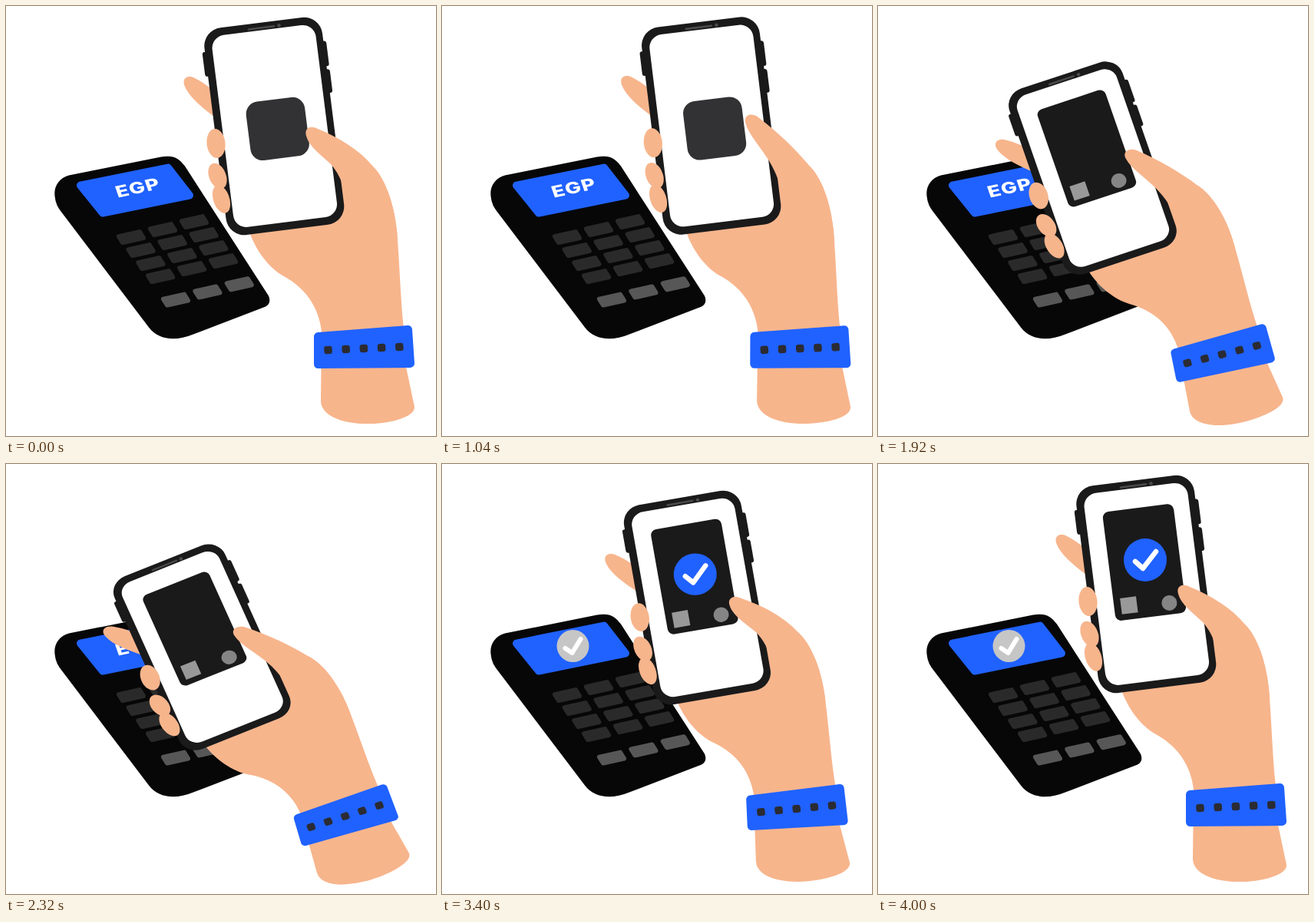
Recreate the animation shown at these times as an HTML page. Size 560x560 px, loop 4160 ms.

```html
<!DOCTYPE html>
<html lang="en">
<head>
<meta charset="utf-8">
<title>Contactless payment</title>
<style>
  html, body { margin: 0; width: 100%; height: 100%; overflow: hidden; background: #fff; }
  svg { display: block; width: 100vw; height: 100vh; }
  .skin { fill: #f7b58c; }
  .blue { fill: #2062ff; }
  .ink { fill: #1a1a1b; }
  .round { stroke-linejoin: round; stroke-linecap: round; }
  .tick { fill: none; stroke: #fff; }
  text { font: 800 21px Inter, "Open Sans", sans-serif; fill: #fff; text-anchor: middle; letter-spacing: .8px; }
</style>
</head>
<body>
<svg viewBox="0 0 560 560">
  <g id="terminal" transform="translate(0 .6)">
    <path fill="#070707" d="M64 250C61 236 68 224 82 220L202 196C217 193 225 197 233 208L342 377Q346 386 338 391L244 427C220 437 198 434 186 418L70 265Q65 258 64 250Z"/>
    <path class="blue round" stroke="#2062ff" stroke-width="10" d="M97 233L211 210L239 246L126 269Z"/>
    <g id="keys"></g>
    <text id="amount" transform="matrix(1.28 -.27 .33 .95 174 243)">EGP</text>
    <g id="paid">
      <circle r="21" fill="#c6c6c6"/>
      <path class="tick round" stroke-width="6" d="M-10 3L-1 9L10 -9"/>
    </g>
  </g>

  <g id="hand">
    <path class="skin" d="M274 146C256 133 239 119 233 105C228 94 237 89 246 94C256 99 262 104 272 111Z"/>
    <path class="skin" d="M318 297L400 200L440 200L478 209C497 228 508 268 510 305C513 345 514 385 518 420L521 470L532 522C533 538 490 545 465 544C432 543 410 531 410 514L411 424C408 397 394 369 361 351.5C341 340 326 318 318 297Z"/>
    <path class="blue round" stroke="#2062ff" stroke-width="11" d="M406.5 430.5L523.5 421.5L526.5 465.5L406.5 466.5Z"/>
    <g id="holes" fill="#2b2b33"></g>

    <g transform="translate(349.3 156.5) rotate(-7.2)">
      <g class="ink">
        <rect x="-81" y="-107" width="10" height="32" rx="3"/>
        <rect x="71" y="-102" width="10" height="33" rx="3"/>
        <rect x="71" y="-65" width="10" height="31" rx="3"/>
        <rect x="-77.4" y="-136" width="154.8" height="272" rx="24"/>
      </g>
      <rect x="-67.5" y="-126" width="136" height="252" rx="17" fill="#fff"/>
      <rect id="icon" x="-34.5" y="-34.5" width="77" height="77" rx="16" fill="#323234"/>
      <g id="card">
        <rect class="ink" x="-46.5" y="-71.5" width="93" height="143" rx="8"/>
        <rect x="-37.5" y="42.5" width="21" height="21" fill="#999"/>
        <circle cx="25.5" cy="56.5" r="10" fill="#858585"/>
      </g>
    </g>
    <path class="round" stroke="#4a4a4c" stroke-width="2.6" d="M316 30.5L349 26.2"/>
    <circle cx="355.5" cy="25.3" r="2.3" fill="#4a4a4c"/>
    <g id="done">
      <circle class="blue" r="28"/>
      <path class="tick round" stroke-width="6.5" d="M-13 2L-3 11L14 -11"/>
    </g>

    <ellipse class="skin" rx="12" ry="19" transform="translate(273.5 179) rotate(-6)"/>
    <ellipse class="skin" rx="11" ry="17.5" transform="translate(275.5 221.5) rotate(-22)"/>
    <ellipse class="skin" rx="10.5" ry="19" transform="translate(280.5 251.5) rotate(-18)"/>
    <path id="thumb" class="skin"/>
  </g>
</svg>
<script>
const LOOP = 4160;
const PIVOT = [466, 541];
const $ = id => document.getElementById(id);

// Smooth 0..1 ramp between two times
const ramp = (t, from, to) => {
  const u = Math.min(1, Math.max(0, (t - from) / (to - from)));
  return u * u * (3 - 2 * u);
};

const key = (x, y, color) =>
  `<path class="round" transform="translate(${x} ${y})" fill="${color}" stroke="${color}" stroke-width="6" d="M-16 -1L11 -7L16 1L-11 7Z"/>`;

let keys = '';
for (let col = 0; col < 3; col++) {
  for (let row = 0; row < 4; row++) {
    keys += key(163 + col * 41 + row * 12.7, 300.5 - col * 10 + row * 17, '#2a2a2a');
  }
  keys += key(221 + col * 41.4, 382 - col * 10.2, '#575757');
}
$('keys').innerHTML = keys;

$('holes').innerHTML = [0, 1, 2, 3, 4].map(i =>
  `<rect x="-5.2" y="-5.2" width="10.4" height="10.4" rx="3" transform="translate(${419.5 + i * 23.2} ${448 - i}) rotate(-4)"/>`).join('');

const place = (id, x, y, scale) =>
  $(id).setAttribute('transform', `translate(${x} ${y}) scale(${scale})`);
const fade = (id, opacity) => $(id).setAttribute('opacity', opacity);

// The hand turns about the wrist and is foreshortened vertically
function poseHand(turn, tilt) {
  const a = turn * 14.7 * Math.PI / 180;
  const b = turn * 16.9 * Math.PI / 180;
  const squash = 1 - .094 * tilt;
  const m = [Math.cos(a), -squash * Math.sin(b), Math.sin(a), squash * Math.cos(b)];
  const [px, py] = PIVOT;
  const e = px - m[0] * px - m[2] * py;
  const f = py - m[1] * px - m[3] * py;
  $('hand').setAttribute('transform', `matrix(${[...m, e, f].join(' ')})`);
}

function poseThumb(lift) {
  const p = (x, y, share) => `${x + 3 * lift * share} ${y - 16 * lift * share}`;
  $('thumb').setAttribute('d',
    `M${p(391, 169, 1)}C${p(388, 159, 1)} ${p(397, 155, 1)} ${p(406, 160, 1)}` +
    `C${p(433, 171, .5)} 460 187 478 209C497 228 508 268 510 305L446 272` +
    `C444 245 438 224 ${p(424, 207, .3)}C${p(411, 194, .7)} ${p(395, 184, 1)} ${p(391, 169, 1)}Z`);
}

function draw(t) {
  const turn = -.014 * ramp(t, 0, 900) + 1.014 * ramp(t, 1430, 2170) + .04 * ramp(t, 2200, 2900)
    - 1.054 * ramp(t, 2980, 3555) + .014 * ramp(t, 3600, 4000);
  const tilt = ramp(t, 1500, 2220) - ramp(t, 3000, 3640);
  poseHand(turn, tilt);
  poseThumb(ramp(t, 40, 480) - ramp(t, 2500, 3150));

  const open = ramp(t, 1200, 1480);
  fade('icon', 1 - open);
  fade('card', open);
  place('card', 1.3, -28.5, .6 + .4 * open);

  place('done', 348, 125, ramp(t, 2480, 2760));
  const paid = ramp(t, 2760, 3200);
  place('paid', 170.5, 236.4, .7 + .3 * paid);
  fade('paid', paid);
  fade('amount', 1 - ramp(t, 2560, 2800));
}

function tick(now) {
  // The last pose holds until the loop restarts
  draw(Math.min(now % LOOP, 4000));
  requestAnimationFrame(tick);
}
tick(performance.now());
</script>
</body>
</html>
```
